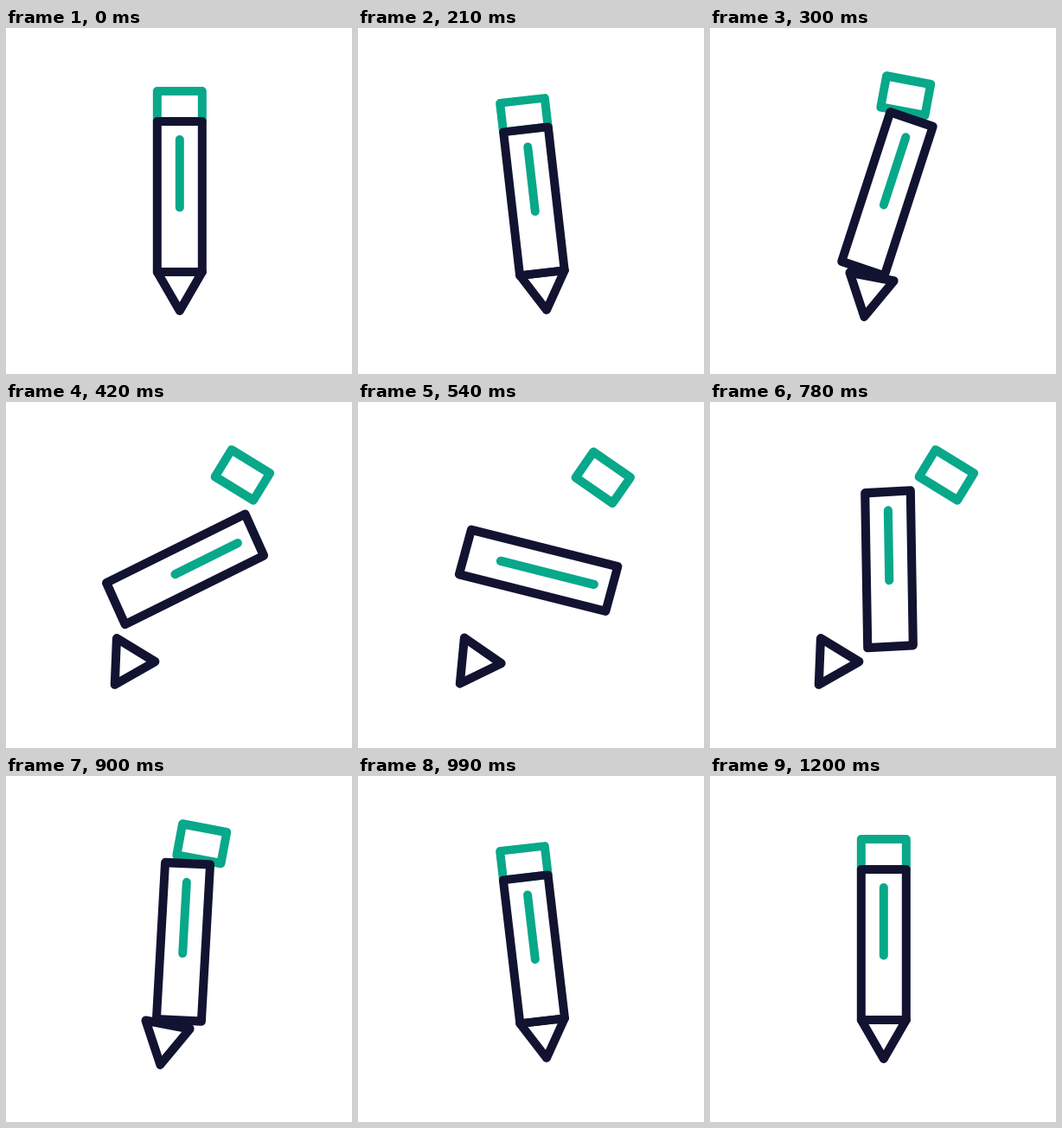
Write an HTML page that moves like this. It is 400 px wide and 400 px high and loops after 3320 ms.

```html
<!DOCTYPE html>
<html lang="en">
<head>
<meta charset="utf-8">
<title>Pencil</title>
<style>
html, body { margin: 0; height: 100%; overflow: hidden; background: #fff; }
svg { display: block; width: 100%; height: 100%; }
path { fill: none; stroke: #121331; stroke-width: 10; stroke-linecap: round; stroke-linejoin: round; }
.green { stroke: #08a88a; }
</style>
</head>
<body>
<svg viewBox="0 0 400 400">
  <g id="pencil">
    <path id="eraser" class="green" d="M-26-127H26V-92H-26Z"/>
    <g id="body">
      <path id="line" class="green"/>
      <path d="M-26-87H26V87H-26Z"/>
    </g>
    <path id="tip" d="M-26 82H26L0 127Z"/>
  </g>
</svg>
<script>
const LOOP = 3320, STEP = 30, MOVE = 1200;
const $ = id => document.getElementById(id);
const pencil = $('pencil'), eraser = $('eraser'), body = $('body'), line = $('line'), tip = $('tip');

const clamp = u => Math.min(1, Math.max(0, u));
const smooth = u => (u = clamp(u), u * u * (3 - 2 * u));
const span = (t, a, b) => clamp((t - a) / (b - a));
// quick start with a long, soft settling
const settle = (u, power) => smooth(1 - (1 - u) ** power);

// eased value through [time, value] pairs
function track(t, keys) {
  let v = keys[0][1];
  for (let i = 1; i < keys.length; i++) {
    const [a, from] = keys[i - 1], [b, to] = keys[i];
    if (t >= a) v = from + (to - from) * smooth(span(t, a, b));
  }
  return v;
}

function draw(t) {
  // everything but the spinning body runs out and back along the same way
  const m = Math.max(0, Math.min(t, MOVE - t));
  const out = span(m, 210, 600);
  const x = track(m, [[0, 200.8], [210, 204], [360, 204], [600, 206]]);
  const y = track(m, [[0, 200], [210, 205], [330, 195.5], [480, 199]]);
  const stretch = track(m, [[0, 1], [210, .96], [330, 1.06], [480, 1.03]]);
  const tilt = -6.6 * smooth(m / 210) + 41.4 * settle(out, 2.235);
  const gap = 22.7 * settle(out, 1.6);
  const spin = 180 * smooth(span(t, 200, 1000));
  const top = -66 + 53.5 * smooth(span(t, 570, 780));
  const bottom = 12.5 + 53.5 * smooth(span(t, 420, 630));

  pencil.setAttribute('transform', `translate(${x} ${y}) rotate(${tilt}) scale(1 ${stretch})`);
  eraser.setAttribute('transform', `translate(0 ${-gap})`);
  tip.setAttribute('transform', `translate(0 ${gap})`);
  body.setAttribute('transform', `translate(0 -5) rotate(${spin})`);
  line.setAttribute('d', `M0 ${top}V${bottom}`);
}

const start = performance.now();
function frame() {
  const t = (performance.now() - start) % LOOP;
  draw(Math.floor(t / STEP) * STEP);
  requestAnimationFrame(frame);
}
frame();
</script>
</body>
</html>
```
